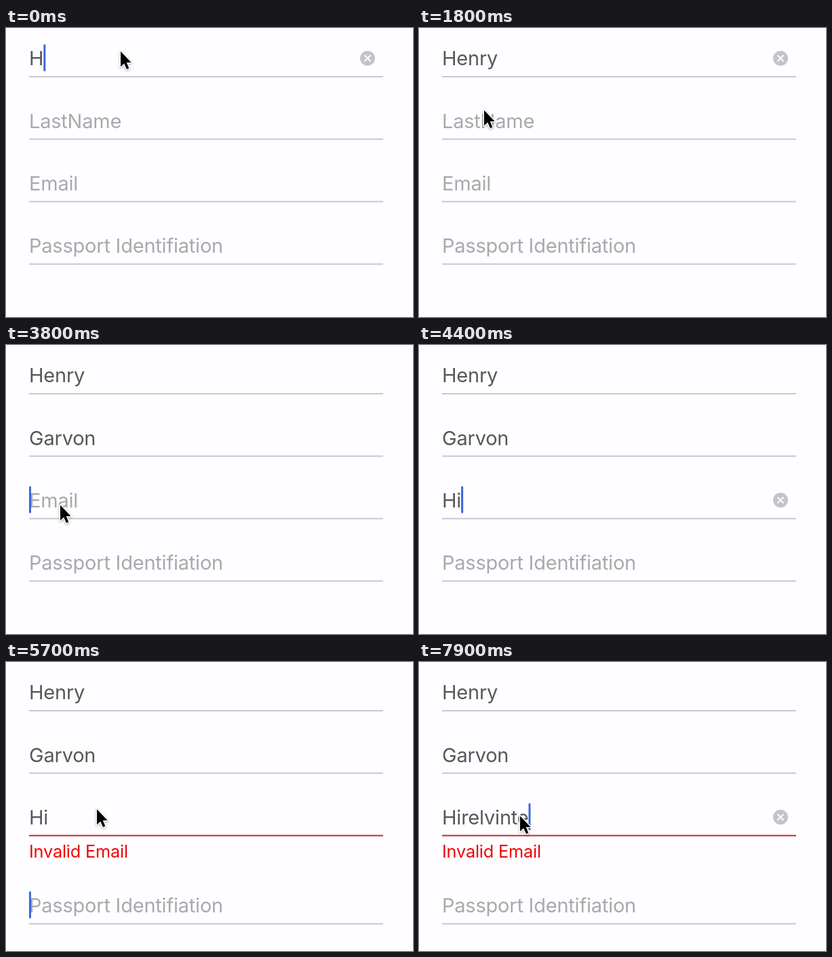
Recreate the animation shown at these times as an HTML page. Size 600 by 427 pixels, loop 8000 ms.

```html
<!DOCTYPE html>
<html lang="en">
<head>
<meta charset="utf-8">
<style>
  html, body { margin: 0; width: 100%; height: 100%; overflow: hidden; background: #fefdff; }
  svg { display: block; }
  text { font: 29px Inter, Roboto, sans-serif; letter-spacing: -0.0075em; fill: #58585b; }
  text.hint { fill: #a9a9ad; }
  text.error { font-size: 25.3px; fill: #ee0508; }
  .line { stroke: #c9c8ce; stroke-width: 1.8; }
  .line.bad { stroke: #bd2c2b; }
  .clear circle { fill: #c4c4c8; }
  .clear path { stroke: #fefdff; stroke-width: 2; stroke-linecap: round; }
  #caret { fill: #3d66d8; }
  #mouse { stroke: #fff; stroke-width: 3; stroke-linejoin: round; paint-order: stroke;
           filter: drop-shadow(0 1.5px 1.5px #0005); }
</style>
</head>
<body>
<svg width="600" height="427" viewBox="0 0 600 427">
  <g id="form"></g>
  <text id="error" class="error" x="34" y="288.5">Invalid Email</text>
  <rect id="caret" width="3" height="40" rx="1.5"/>
  <path id="mouse" d="M1 1.5v22.7l5.2-4.7 3.8 8.5 3.3-1.5-3.5-8.5h6.9z"/>
</svg>
<script>
const LOOP = 8000, STEP = 100, PITCH = 92.25, LEFT = 34;
const $ = id => document.getElementById(id);

// Times of n key presses with a fixed gap.
const burst = (start, n, gap) => Array.from({ length: n }, (_, i) => start + i * gap);

const fields = [
  { hint: 'FirstName', value: 'Henry', keys: [0, ...burst(400, 4, 100)], focus: [0] },
  { hint: 'LastName', value: 'Garvon', keys: burst(2200, 6, 140), focus: [2000] },
  { hint: 'Email', value: 'Hirelvinte', keys: [...burst(4200, 2, 200), ...burst(6800, 8, 110)], focus: [3600, 5900] },
  { hint: 'Passport Identifiation', value: '', keys: [], focus: [5400] }
];
const keys = fields.flatMap(f => f.keys);
const events = [...keys, ...fields.flatMap(f => f.focus)];

const moves = [
  { at: 0, ms: 1, to: [168, 33] },
  { at: 1000, ms: 800, to: [95, 120] },
  { at: 3100, ms: 500, to: [79, 235] },
  { at: 3900, ms: 200, to: [146, 204] },
  { at: 4700, ms: 500, to: [63, 306] },
  { at: 5400, ms: 300, to: [133, 216] },
  { at: 5700, ms: 700, to: [148, 226] },
  { at: 7700, ms: 1, to: [148, 226] }
];

const clamp = v => Math.min(1, Math.max(0, v));
const smooth = k => k * k * (3 - 2 * k);
const latest = (times, t) => Math.max(...times.filter(a => a <= t));
const show = (el, on) => el.setAttribute('opacity', +on);
const place = (el, x, y) => el.setAttribute('transform', `translate(${x} ${y})`);

fields.forEach(f => {
  f.row = document.createElementNS('http://www.w3.org/2000/svg', 'g');
  f.row.innerHTML = `<text x="${LEFT}" y="55.3"></text>
    <path class="line" d="M${LEFT} 72H556"/>
    <g class="clear"><circle cx="533" cy="44.7" r="11"/>
    <path d="M529 40.7l8 8m0-8l-8 8"/></g>`;
  [f.text, f.line, f.clear] = f.row.children;
  $('form').append(f.row);
});

function drawForm(t) {
  const focusTime = latest(fields.flatMap(f => f.focus), t);
  const slide = clamp((t - 5300) / 300);

  fields.forEach((f, i) => {
    const typed = f.value.slice(0, f.keys.filter(k => k <= t).length);
    const active = f.focus.includes(focusTime);
    const y = i * PITCH + (i === 3 ? 38 * slide : 0);
    f.text.textContent = typed || f.hint;
    f.text.setAttribute('class', typed ? '' : 'hint');
    f.line.classList.toggle('bad', i === 2 && slide > 0);
    show(f.clear, active && typed !== '');
    place(f.row, 0, y);
    if (active) place($('caret'), LEFT + (typed && f.text.getComputedTextLength()), y + 24);
  });

  show($('error'), slide);
  show($('caret'), (t - latest(events, t)) % 1150 < 750);
}

// Typing hides the pointer until it moves again.
function drawMouse(t) {
  let pos = moves[0].to;
  for (const { at, ms, to } of moves) {
    const k = smooth(clamp((t - at) / ms));
    pos = pos.map((p, i) => p + (to[i] - p) * k);
  }
  const moved = latest(moves.map(m => m.at), t);
  show($('mouse'), !keys.some(k => k >= moved && k < t));
  place($('mouse'), ...pos);
}

function tick() {
  const t = Math.floor(performance.now() % LOOP / STEP) * STEP;
  drawForm(t);
  drawMouse(t);
  requestAnimationFrame(tick);
}
tick();
</script>
</body>
</html>
```
